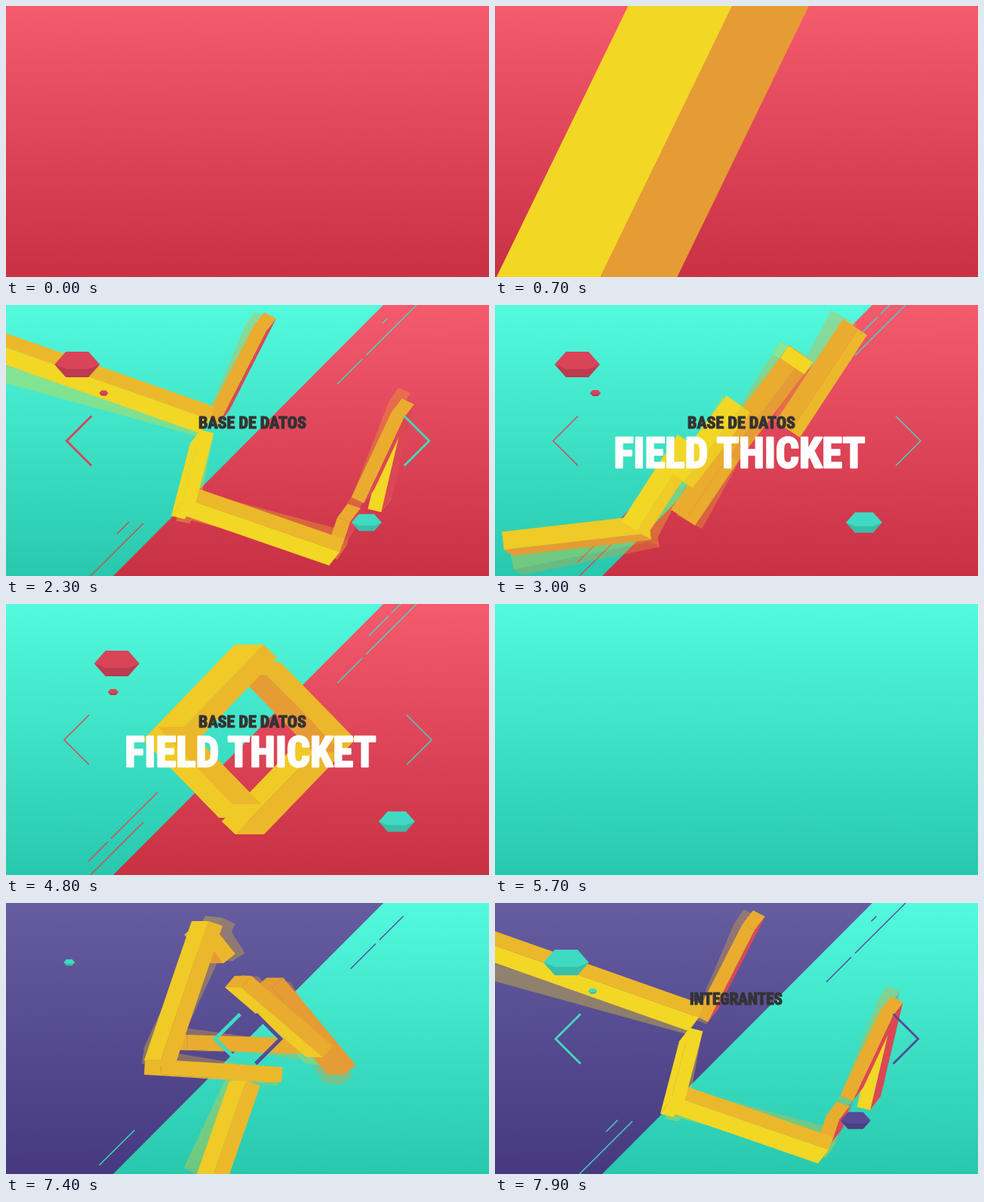
Write an HTML page that moves like this. It is 640 px wide and 360 px high and loops after 8 s.

```html
<!DOCTYPE html>
<html lang="es">
<head>
<meta charset="utf-8">
<title>Intro</title>
<style>
  html, body { margin: 0; width: 100%; height: 100%; overflow: hidden; background: #e04a5c; }
  svg { display: block; width: 100vw; height: 100vh; }
  text {
    font-family: "Roboto Condensed", "Open Sans", "Liberation Sans", sans-serif;
    font-weight: 800; font-stretch: 75%;
    text-anchor: middle; stroke-linejoin: round;
  }
</style>
</head>
<body>
<svg viewBox="0 0 640 360">
  <defs id="defs"></defs>
  <g id="stage"></g>
  <g id="labels"></g>
</svg>
<script>
const LOOP = 8000, STEP = 100, SECOND_START = 5600;
const $ = id => document.getElementById(id);

const tones = {
  red:    { top: '#f55a6d', bottom: '#c83043', flat: '#d94459' },
  teal:   { top: '#53fadd', bottom: '#28c8ad', flat: '#40dac2' },
  purple: { top: '#655da0', bottom: '#46397f', flat: '#574a96' }
};
const paints = {
  y: '#f2d725', l: '#f0ca26', m: '#ecb82b', a: '#e9ac2e', d: '#e69c34', r: '#db4854'
};

const clamp = v => Math.max(0, Math.min(1, v));
const lerp = (a, b, f) => a + (b - a) * f;
const smooth = f => f * f * (3 - 2 * f);
const span = (t, from, to) => clamp((t - from) / (to - from));
const leaving = t => smooth(span(t, 4900, 5300));

// A bar is a box seen at an angle: paints of its two long faces,
// then both ends of the edge between them.
const broken = {
  t: 1500, depth: [-36, 1], width: 29, swing: 0, power: 1,
  bars: [
    ['md', 303, 58, 452, 168],
    ['md', 208, 212, 325, 291],
    ['dl', 183, 196, 284, 325],
    ['ml', 300, 58, 183, 196],
    ['lm', 312, 330, 452, 168]
  ]
};

const spread = {
  t: 1800, depth: [-22, 0], width: 20, swing: 6, power: 1,
  bars: [
    ['md', 258, 42, 288, 80],
    ['aa', 240, 195, 400, 200],
    ['ml', 318, 236, 275, 360],
    ['ml', 268, 24, 205, 209],
    ['mm', 205, 228, 365, 238],
    ['dd', 352, 112, 448, 228],
    ['al', 312, 112, 420, 205]
  ]
};

const chain = {
  t: 2300, depth: [-14, 18], width: 18, swing: -4, power: 1,
  bars: [
    ['ar', 282, 158, 344, 36],
    ['ar', 446, 318, 456, 288],
    ['my', 240, 258, 442, 328],
    ['my', -10, 53, 270, 152],
    ['yy', 258, 166, 233, 262],
    ['yr', 497, 275, 526, 152],
    ['ar', 474, 263, 527, 150]
  ]
};

const rising = {
  t: 3000, depth: [-12, -8], width: 24, swing: -5, power: 2,
  bars: [
    ['am', 392, 168, 481, 32],
    ['aa', 253, 285, 320, 185],
    ['ld', 12, 325, 195, 304],
    ['yl', 188, 300, 262, 185],
    ['ad', 310, 200, 409, 68],
    ['yl', 250, 235, 326, 135],
    ['yy', 398, 84, 409, 68]
  ]
};

// The closed frame is point-symmetric about (322.5, 180).
const topLeft = ['ml', 341, 54, 220, 180], topRight = ['md', 345, 94, 445, 197];
const opposite = ([, ...ends]) => ['lm', ...ends.map((v, i) => (i % 2 ? 360 : 645) - v)];
const closed = {
  t: 4500, depth: [-38, 0], width: 25, swing: 0, power: 1,
  bars: [opposite(topLeft), topRight, topLeft, opposite(topRight)]
};

// Close-up: the frame surrounds the view and one bar crosses it.
const closeUp = (t, power, shift) => ({
  t, power, depth: [-165, 0], width: 108, swing: 0,
  bars: broken.bars.map(([shades, ...ends], i) => i === 3
    ? ['dy', 359 + shift, -100, 101 + shift, 460]
    : [shades, ...ends.map((v, k) => lerp(k % 2 ? 180 : 320, v, 6))])
});

const poses = [closeUp(100, 1, -620), closeUp(600, 2, 0), broken, spread, chain, rising, closed];

function box([shades, px, py, qx, qy], depth, width) {
  const length = Math.hypot(qx - px, qy - py) || 1;
  const nx = (qy - py) / length * width, ny = (px - qx) / length * width;
  // The depth face always lies on the far side of the edge.
  const sign = nx * depth[0] + ny * depth[1] > 0 ? -1 : 1;
  const sx = depth[0] * sign, sy = depth[1] * sign;
  const quad = (x, y, ax, ay, bx, by, paint) =>
    `<path d="M${x} ${y}l${ax} ${ay} ${bx} ${by} ${-ax} ${-ay}z" fill="${paints[paint]}"/>`;
  const [face, side] = shades;
  return quad(px, py, nx, ny, sx, sy, face) + quad(qx, qy, nx, ny, sx, sy, face) +
    quad(px, py, qx - px, qy - py, sx, sy, side) +
    quad(px, py, qx - px, qy - py, nx, ny, face);
}

function drawFrame(t) {
  if (t < poses[0].t) return '';
  let i = 0;
  while (i < poses.length - 2 && t >= poses[i + 1].t) i++;
  const a = poses[i], b = poses[i + 1];
  const f = 1 - (1 - span(t, a.t, b.t)) ** a.power;
  const mix = (u, v) => u.map((n, k) => lerp(n, v[k], f));
  const barOf = (pose, n) => pose.bars[Math.min(n, pose.bars.length - 1)];
  const depth = mix(a.depth, b.depth), width = lerp(a.width, b.width, f);
  let body = '';
  for (let n = 0; n < Math.max(a.bars.length, b.bars.length); n++) {
    const [shadeA, ...endsA] = barOf(a, n), [shadeB, ...endsB] = barOf(b, n);
    body += box([f < 0.5 ? shadeA : shadeB, ...mix(endsA, endsB)], depth, width);
  }
  const swing = lerp(a.swing, b.swing, f);
  const ghost = Math.abs(swing) > 0.4
    ? `<g opacity=".35" transform="rotate(${swing} 320 190)">${body}</g>` : '';
  return `<g transform="translate(322.5 180) scale(${1 - leaving(t)}) translate(-322.5 -180)">
    ${ghost}${body}</g>`;
}

function chevrons(t, left, right) {
  const shown = 100 * span(t, 1300, 1610) * (1 - leaving(t));
  if (!shown) return '';
  const tip = lerp(304, 77, smooth(span(t, 1650, 2350)));
  const width = 1.4 + 4 * Math.sin(Math.PI * span(t, 1500, 2400));
  const arm = (x, dir, color) => `<path d="M${x + 33 * dir} ${180.5 - 33 * dir}l${-33 * dir} ${33 * dir}
    l${33 * dir} ${33 * dir}" pathLength="100" stroke-dasharray="${shown} 200"
    fill="none" stroke="${color}" stroke-width="${width}"/>`;
  return arm(tip, 1, left) + arm(641 - tip, -1, right);
}

function streaks(t, left, right) {
  // Each streak lies on the diagonal x + y = sum and grows from its middle.
  const streak = (begin, sum, lo, hi, color, dash) => {
    const half = (hi - lo) / 2 * span(t, begin, begin + 600) * (1 - leaving(t));
    const x = (lo + hi) / 2;
    return half && `<path d="M${x - half} ${sum - x + half}L${x + half} ${sum - x - half}"
      stroke="${color}" stroke-width="1.4" stroke-dasharray="${dash}"/>`;
  };
  return [
    streak(1400, 544, 439, 544, right, '47 7 300'),
    streak(1400, 472, 112, 182, left, 'none'),
    streak(2200, 523, 481, 523, right, '37 5 300'),
    streak(2200, 451, 109, 201, left, '37 6 300')
  ].map(s => s || '').join('');
}

function gem(x, y, scale, color) {
  return `<g transform="translate(${x} ${y}) scale(${scale})">
    <path d="M-30 0L-15-17H15L30 0L15 17H-15Z" fill="${color}"/>
    <path d="M-30 0L-15 17H15L30 0L15 6H-15Z" fill="#000" opacity=".13"/></g>`;
}

function gems(t, left, right) {
  const grown = begin => span(t, begin, begin + 600) * (1 - leaving(t));
  const age = t - 3000;
  return gem(109 + age * 0.021, 79, grown(1650), left) +
         gem(133 + age * 0.005, 117, grown(1800) * 0.24, left) +
         gem(489 + age * 0.016, 289, grown(1800) * 0.8, right);
}

function drawScene(t, left, right) {
  const shift = 510 * (span(t, 700, 1000) - 1 + smooth(span(t, 4900, 5400)));
  const a = tones[left].flat, b = tones[right].flat;
  return `<rect width="640" height="360" fill="url(#${right})"/>
    <path d="M-900 0H${500 + shift}L${142 + shift} 360H-900Z" fill="url(#${left})"/>` +
    streaks(t, b, a) + drawFrame(t) + gems(t, b, a) + chevrons(t, b, a);
}

function makeLabel(words, x, middle, cap, width, color, weight) {
  const el = document.createElementNS('http://www.w3.org/2000/svg', 'text');
  el.textContent = words;
  $('labels').append(el);
  const wanted = cap / 0.714;
  el.style.fontSize = wanted + 'px';
  const size = wanted * Math.min(1, width / el.getComputedTextLength());
  el.style.fontSize = size + 'px';
  const attrs = { x, y: middle + size * 0.357, fill: color, stroke: color, 'stroke-width': weight };
  for (const name in attrs) el.setAttribute(name, attrs[name]);
  return el;
}

function showLabel(el, t, from, to) {
  const hidden = (1 - span(t, from, to)) ** 3;
  el.setAttribute('opacity', (1 - hidden) * (1 - leaving(t)));
  el.setAttribute('transform', `translate(0 ${hidden * 14})`);
}

$('defs').innerHTML = Object.entries(tones).map(([name, tone]) =>
  `<linearGradient id="${name}" gradientUnits="userSpaceOnUse" x1="0" y1="0" x2="0" y2="360">
    <stop stop-color="${tone.top}"/><stop offset="1" stop-color="${tone.bottom}"/>
  </linearGradient>`).join('');

const title = makeLabel('FIELD THICKET', 324, 196.5, 42, 333, '#fff', 2.4);
const heading = makeLabel('BASE DE DATOS', 326.5, 156.5, 18, 143, '#333', 1.2);
const members = makeLabel('INTEGRANTES', 319.5, 127.5, 18, 123, '#333', 1.2);

function render(time) {
  const first = time < SECOND_START;
  const t = first ? time : time - SECOND_START;
  $('stage').innerHTML = first ? drawScene(t, 'teal', 'red') : drawScene(t, 'purple', 'teal');
  showLabel(heading, first ? t : 0, 2100, 2300);
  showLabel(title, first ? t : 0, 2300, 2600);
  showLabel(members, first ? 0 : t, 2100, 2300);
}

const start = performance.now();
let last = -1;
function tick() {
  const time = Math.floor((performance.now() - start) % LOOP / STEP) * STEP;
  if (time !== last) render(last = time);
  requestAnimationFrame(tick);
}
tick();
</script>
</body>
</html>
```
